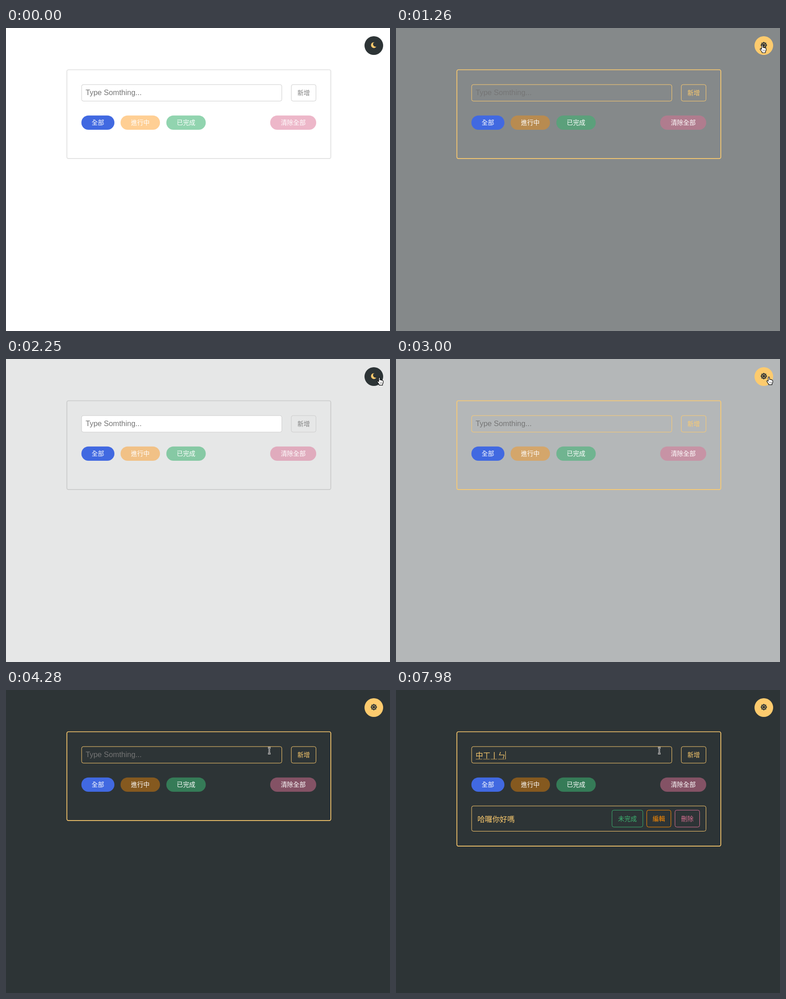
These frames come from a looping animation (843 by 664 pixels, 8000 ms). An HTML page with a canvas:

```html
<!DOCTYPE html>
<html lang="zh-Hant">
<head>
<meta charset="utf-8">
<title>Todo</title>
<style>
  html, body { margin: 0; width: 100%; height: 100%; overflow: hidden; background: #fff; }
  canvas { display: block; }
</style>
</head>
<body>
<canvas id="stage" width="843" height="664"></canvas>
<script>
const ctx = document.getElementById('stage').getContext('2d');
const LOOP = 8000, FADE = 280;
const GOLD = '#fdcb6e', INK = '#2d3436';
const CJK = '"Noto Sans CJK TC", "Noto Sans CJK", sans-serif';
const LATIN = '"Liberation Sans", Arial, sans-serif';
const EM = 16.4, SMALL = 13.67;

// Theme fades: start time and whether the new theme is dark
const toggles = [[1108, true], [2038, false], [2885, true]];
const FLIP_LEAD = 14;

// Pointer stops: time, x, y of the hot spot
const stops = [
  [130, 714, 632], [840, 816, 38], [1040, 816, 38], [1105, 804, 36.6],
  [1390, 804, 36.6], [1620, 812, 39], [1980, 812, 39], [2030, 819.6, 39.8],
  [2625, 819.6, 39.8], [2660, 818.5, 38.8], [3170, 818.5, 38.8], [3630, 584, 128],
  [3675, 584, 128], [3850, 578, 133]
];

// Contents of the input while composing
const typing = [
  [0, ''], [4490, 'ㄏ'], [4750, 'ㄏㄚ'], [4850, '哈'], [4960, '哈ㄌ'],
  [5060, '哈ㄌㄨ'], [5170, '哈ㄌㄨㄛ'], [5690, '哈囉'], [5940, '哈囉ㄋ'],
  [6030, '哈囉ㄋ丨'], [6120, '哈囉你'], [6220, '哈囉你ㄏ'], [6310, '哈囉你ㄏㄠ'],
  [6410, '哈囉你好'], [6590, '哈囉你好ㄇ'], [6650, '哈囉你好ㄇㄚ'], [6720, '哈囉你好嗎'],
  [7240, ''], [7490, 'ㄓ'], [7560, 'ㄓㄨ'], [7720, 'ㄓㄨㄥ'], [7790, '中'],
  [7850, '中ㄒ'], [7910, '中ㄒ丨'], [7975, '中ㄒ丨ㄣ']
];
const COMMIT = 6980, ADDED = 7240, FOCUS = 3780;

const clamp = v => Math.min(1, Math.max(0, v));
const smooth = v => v * v * (3 - 2 * v);
const mix = (a, b, k) => a + (b - a) * k;

// cubic-bezier(.42, 0, .58, 1)
function easeInOut(x) {
  let lo = 0, hi = 1;
  for (let i = 0; i < 20; i++) {
    const s = (lo + hi) / 2, r = 1 - s;
    if (3 * r * r * s * 0.42 + 3 * r * s * s * 0.58 + s ** 3 < x) lo = s; else hi = s;
  }
  return smooth(lo);
}

function themeAt(t) {
  let dark = false, level = 0;
  for (const [start, next] of toggles) {
    if (t < start - FLIP_LEAD) break;
    dark = next;
    level = mix(level, next ? 1 : 0, easeInOut(clamp((t - start) / FADE)));
  }
  return { dark, level };
}

function pointerAt(t) {
  if (t < stops[0][0]) return null;
  let i = 0;
  while (i < stops.length - 1 && t >= stops[i + 1][0]) i++;
  const a = stops[i], b = stops[i + 1] || a;
  const k = a === b ? 0 : smooth((t - a[0]) / (b[0] - a[0]));
  return { x: mix(a[1], b[1], k), y: mix(a[2], b[2], k) };
}

function roundRect(x, y, w, h, r) {
  ctx.beginPath();
  ctx.roundRect(x, y, w, h, r);
}

function outline(x, y, w, h, color, fill) {
  roundRect(x + 0.5, y + 0.5, w - 1, h - 1, 4);
  if (fill) { ctx.fillStyle = fill; ctx.fill(); }
  ctx.strokeStyle = color;
  ctx.lineWidth = 1;
  ctx.stroke();
}

function label(text, x, y, size, color, align = 'center') {
  ctx.font = `${size}px ${CJK}`;
  ctx.textAlign = align;
  ctx.fillStyle = color;
  ctx.fillText(text, x, y + size * 0.38);
}

function pill(text, x, w, color) {
  roundRect(x, 191.8, w, 31.2, 15.6);
  ctx.fillStyle = color;
  ctx.fill();
  label(text, x + w / 2, 207, SMALL, '#fff');
}

function button(text, x, y, w, h, border, color = border) {
  outline(x, y, w, h, border);
  label(text, x + w / 2, y + h / 2 - 0.2, SMALL, color);
}

function disc(x, y, r, color) {
  ctx.beginPath();
  ctx.arc(x, y, r, 0, Math.PI * 2);
  ctx.fillStyle = color;
  ctx.fill();
}

function moon() {
  ctx.beginPath();
  ctx.arc(807.6, 37.5, 6.3, -1.25, 0.62, true);
  ctx.arc(811.2, 35.6, 5.4, 1.2, -2.2);
  ctx.closePath();
  ctx.fillStyle = GOLD;
  ctx.fill();
}

function sun() {
  const x = 807.5, y = 37.5;
  ctx.beginPath();
  for (let i = 0; i < 16; i++) {
    const a = i * Math.PI / 8, r = i % 2 ? 5.6 : 7.4;
    ctx.lineTo(x + r * Math.cos(a), y + r * Math.sin(a));
  }
  ctx.closePath();
  ctx.fillStyle = INK;
  ctx.fill();
  disc(x, y, 3.7, GOLD);
  disc(x, y, 2.8, INK);
}

function drawToggle(dark) {
  disc(807.5, 38.5, 20.5, dark ? GOLD : INK);
  if (dark) sun(); else moon();
}

function drawInput(t, dark) {
  outline(165.5, 123.5, 440.5, 37.2, dark ? GOLD : '#ccc', dark ? null : '#fff');
  const text = typing.filter(step => step[0] <= t).pop()[1];
  if (!text) {
    ctx.font = `${EM}px ${LATIN}`;
    ctx.textAlign = 'left';
    ctx.fillStyle = '#757575';
    ctx.fillText('Type Somthing...', 174.7, 147.3);
  }
  label(text, 174.7, 142.6, EM, GOLD, 'left');

  const composing = text && !(t >= COMMIT && t < ADDED);
  if (composing) {
    ctx.fillStyle = 'rgba(253, 203, 110, .65)';
    for (let i = 0; i < text.length; i++) ctx.fillRect(175 + i * EM, 151, EM - 2, 1);
  }
  const blinkedOff = t >= 4280 && t < 4490;
  if (t >= FOCUS && !blinkedOff) {
    ctx.fillStyle = GOLD;
    ctx.fillRect(Math.floor(175 + text.length * EM), 134, 1, 18);
  }
}

function drawItem() {
  outline(165.5, 253.6, 515.5, 56.4, GOLD);
  label('哈囉你好嗎', 178.7, 282.5, EM, GOLD, 'left');
  button('未完成', 473.7, 262.8, 68.7, 38, 'mediumseagreen');
  button('編輯', 550, 262.8, 54, 38, 'darkorange');
  button('刪除', 612, 262.8, 55, 38, 'palevioletred');
}

const shapes = {
  arrow: new Path2D('M0 0V15.5L3.6 12.2L6 17.8L8.6 16.7L6.2 11.2H11Z'),
  hand: new Path2D('M-1.4 1.6C-1.4 0 1.4 0 1.4 1.6V6.2C2 5.3 4 5.5 4.2 6.8' +
    'C5 6 6.6 6.4 6.8 7.7C7.6 7.1 8.6 7.6 8.6 9V12.4L7 15.4V17.6H-.4V16' +
    'L-3.2 12.4L-4.6 10C-4.8 8.4 -3 8 -2.2 9.2L-1.4 10.2Z'),
  beam: new Path2D('M-3 -6.5H-1Q0 -6.5 0 -5.5Q0 -6.5 1 -6.5H3M0 -5.5V5.5' +
    'M-3 6.5H-1Q0 6.5 0 5.5Q0 6.5 1 6.5H3')
};

function strokeShape(shape, color, width) {
  ctx.strokeStyle = color;
  ctx.lineWidth = width;
  ctx.stroke(shape);
}

function drawPointer(p) {
  const overToggle = Math.hypot(p.x - 807.5, p.y - 38.5) < 20.5;
  const overInput = p.x > 166 && p.x < 606 && p.y > 124 && p.y < 161;
  ctx.save();
  ctx.translate(p.x, p.y);
  ctx.lineJoin = 'round';
  if (overInput) {
    strokeShape(shapes.beam, '#fff', 2.8);
    strokeShape(shapes.beam, '#111', 1);
  } else if (overToggle) {
    ctx.fillStyle = '#fff';
    ctx.fill(shapes.hand);
    strokeShape(shapes.hand, '#000', 1.1);
    ctx.beginPath();
    for (const x of [1.6, 3.8, 6]) {
      ctx.moveTo(x, 11);
      ctx.lineTo(x, 14.5);
    }
    ctx.lineWidth = 0.5;
    ctx.stroke();
  } else {
    strokeShape(shapes.arrow, '#fff', 2);
    ctx.fillStyle = '#000';
    ctx.fill(shapes.arrow);
  }
  ctx.restore();
}

function draw(t) {
  const { dark, level } = themeAt(t);
  const added = t >= ADDED;
  const tone = c => Math.round(mix(255, c, level));
  ctx.fillStyle = `rgb(${tone(45)}, ${tone(52)}, ${tone(54)})`;
  ctx.fillRect(0, 0, 843, 664);

  roundRect(133.6, 91.5, 579.5, added ? 250.6 : 194.6, 3.5);
  ctx.strokeStyle = dark ? GOLD : 'rgba(0, 0, 0, .125)';
  ctx.lineWidth = 1.7;
  ctx.stroke();

  drawToggle(dark);
  drawInput(t, dark);
  button('新增', 625.8, 123.5, 55.2, 37.2, dark ? GOLD : '#ccc', dark ? GOLD : '#808080');
  pill('全部', 165.5, 72.5, 'royalblue');
  pill('進行中', 251.5, 86.5, 'rgba(255, 140, 0, .42)');
  pill('已完成', 352, 86.5, 'rgba(60, 179, 113, .56)');
  pill('清除全部', 580, 101, 'rgba(219, 112, 147, .5)');
  if (added) drawItem();

  const pointer = pointerAt(t);
  if (pointer) drawPointer(pointer);
}

const began = performance.now();
function tick() {
  draw((performance.now() - began) % LOOP);
  requestAnimationFrame(tick);
}
tick();
</script>
</body>
</html>
```
